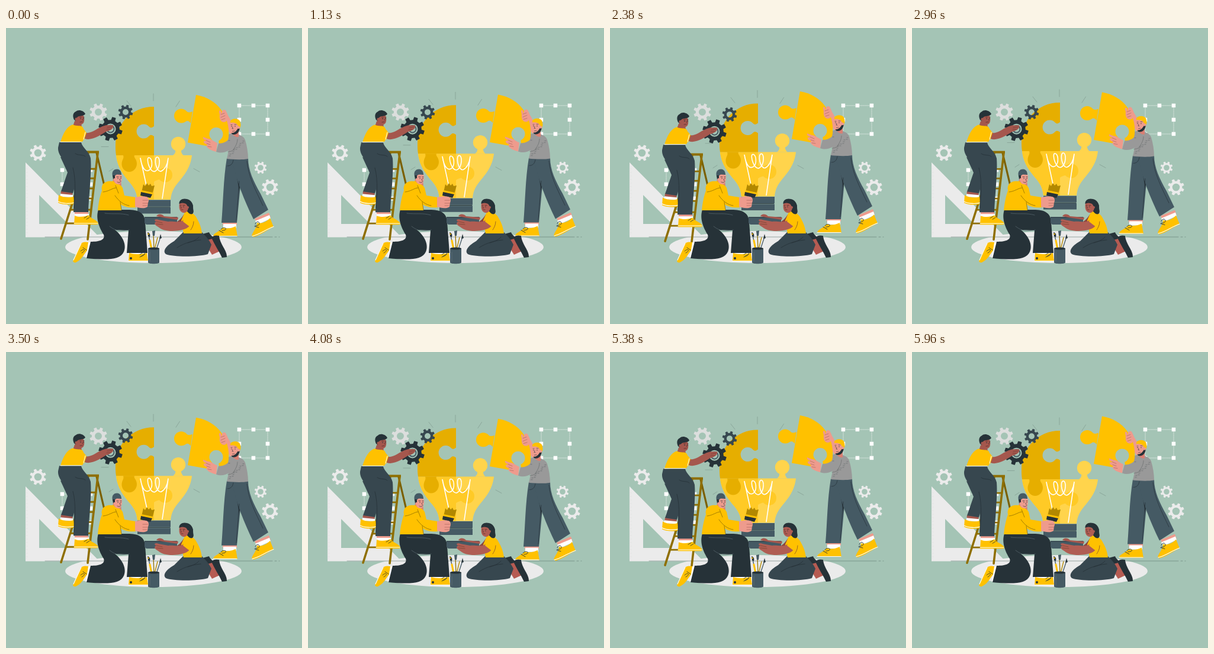
Animation of 500x500 px, one loop 6 s. Source, as an HTML page with a canvas:

```html
<!DOCTYPE html>
<html lang="en">
<head>
<meta charset="utf-8">
<title>Building an idea</title>
<style>
html, body { margin: 0; width: 100%; height: 100%; overflow: hidden; background: #a4c4b5; }
canvas { display: block; width: 500px; height: 500px; }
</style>
</head>
<body>
<canvas id="stage"></canvas>
<script>
const LOOP = 6000;
const BG = '#a4c4b5', YEL = '#ffc100', DARK = '#263238', NAVY = '#37474f', SLATE = '#455a64';
const PALE = '#ebebeb', BROWN = '#a5574d', PINK = '#ee9b8d', GOLD = '#e6ae00', WOOD = '#8f6f00';
const GLASS = '#ffd44c', AMBER = '#ffca26';
const canvas = document.getElementById('stage');
const dpr = Math.max(1, window.devicePixelRatio || 1);
canvas.width = canvas.height = 500 * dpr;
const c = canvas.getContext('2d');
const cache = {};

const path = d => cache[d] || (cache[d] = new Path2D(d));
function fill(d, color) {
  c.fillStyle = color;
  c.fill(path(d));
}
function line(d, color, width = 1) {
  c.strokeStyle = color;
  c.lineWidth = width;
  c.lineCap = c.lineJoin = 'round';
  c.stroke(path(d));
}
function oval(x, y, rx, ry, color) {
  c.fillStyle = color;
  c.beginPath();
  c.ellipse(x, y, rx, ry, 0, 0, 7);
  c.fill();
}
const dot = (x, y, r, color) => oval(x, y, r, r, color);
function shifted(dy, draw) {
  c.save();
  c.translate(0, dy);
  draw();
  c.restore();
}

// Back and forth between 0 and 1, linear in both directions
function tri(t, period) {
  const u = (t % period) / period;
  return u < .5 ? 2 * u : 2 - 2 * u;
}
function track(t, keys) {
  for (let i = 1; i < keys.length; i++) {
    const [a, x] = keys[i - 1], [b, y] = keys[i];
    if (t <= b) return x + (y - x) * (t - a) / (b - a);
  }
  return keys[keys.length - 1][1];
}
const SWAY = [[0, 0], [550, -.8], [1120, 0], [1400, 3.8], [1950, 4.6], [2500, 4], [2700, 1.5], [3000, 0]];

function gear(x, y, r, hole, color, turn = .39) {
  const n = 8, step = Math.PI * 2 / n;
  c.fillStyle = color;
  c.beginPath();
  for (let i = 0; i < n; i++) {
    for (const [f, k] of [[-.3, .75], [-.2, 1], [.2, 1], [.3, .75]]) {
      const a = turn + (i + f) * step;
      c.lineTo(x + Math.cos(a) * r * k, y + Math.sin(a) * r * k);
    }
  }
  c.closePath();
  c.moveTo(x + hole, y);
  c.arc(x, y, hole, 0, 7);
  c.fill('evenodd');
}

function selection(x, y, s) {
  c.strokeStyle = 'rgba(240,244,242,.75)';
  c.lineWidth = .8;
  c.setLineDash([2, 1]);
  c.strokeRect(x, y, s, s);
  c.setLineDash([]);
  c.fillStyle = '#fff';
  for (let i = 0; i < 3; i++) {
    for (let j = 0; j < 3; j++) {
      if (i !== 1 || j !== 1) c.fillRect(x + i * s / 2 - 3.3, y + j * s / 2 - 3.3, 6.5, 6.5);
    }
  }
}

function backdrop() {
  c.fillStyle = BG;
  c.fillRect(0, 0, 500, 500);
  c.fillStyle = PALE;
  c.fill(path('M33 227L158 353.5H33ZM56 282V331H105Z'), 'evenodd');
  for (let y = 235; y < 352; y += 3) line(`M33 ${y}H${y % 2 ? 34.5 : 36}`, '#d8dfdb', .7);
  oval(249, 370, 149, 27, PALE);
  line('M66 353H450M454 353H457M461 353H462', '#60766f', .6);
  selection(394, 131, 48);
  selection(95, 240, 48);
  gear(156, 142, 15, 6, '#dcdedd');
  gear(54, 211, 14, 6.3, PALE);
  gear(430, 236, 10.5, 4.8, PALE);
  gear(446, 269, 14, 6.3, PALE);
}

function rays() {
  line('M249 111V123M204 123L211 132M293.500 123L287 133M161 200.500H173M174 242L181 237.500M317 237.500L327 243', '#859f93', .8);
}

function bulb() {
  fill('M186 215H314C312 236 300 250 290 262C281 273 279 281 278 290H222C221 281 219 273 210 262C200 250 188 236 186 215Z', GLASS);
  fill('M250 215H186C188 236 200 250 210 262C219 273 221 281 222 290H250Z', AMBER);
  fill('M250 133C214 132.500 185 161 185 198C185 204 185 209 186 215H250V183C246 180 244 180 241.500 182.500A12 12 0 1 1 241.500 166.500C244 169 246 169 250 166Z', GOLD);
  fill('M198 215H217C215 219 221 221 221 229C221 237 215 243 208 243C201 243 195.500 237 195.500 230C195.500 222 200 221 198 215Z', GOLD);
  dot(291, 196, 12.2, GLASS);
  fill('M286 205H296C295 210 298 214 300 215H282C285 213 287 210 286 205Z', GLASS);
  fill('M249.500 237C254 240 257 241 259 240C266 233 281 236 281 248C281 261 266 264 259 256C257 256 254 257 249.500 260Z', AMBER);
  line('M238 270L227 220C230 238 236 244 242 240C249 235 247 218 241 219C236 220 243 246 252 242C261 237 261 217 255 218C249 220 254 244 262 242C270 238 273 228 274 220L264 288', '#fff', 1.6);
  fill('M222 290.500H278V301.500H222Z', SLATE);
  fill('M222 303H278V313.500H222Z', SLATE);
  line('M223 302.200H277', DARK, 1);
}

function ladder() {
  line('M153 211L166 266L180 330', '#7b6000', 3.2);
  line('M139 211L93 356', WOOD, 3.6);
  for (const y of [238, 254, 271, 288, 307, 330]) {
    const k = (y - 211) / 145;
    line(`M${139 - 46 * k} ${y}H${155 - 17 * k}`, WOOD, 2.8);
  }
  line('M155 211L138 357', WOOD, 3.6);
  fill('M132 207.500H157V211.500H132Z', WOOD);
}

function climber() {
  ladder();
  gear(202, 142, 12.5, 5, NAVY, .3);
  gear(176.500, 170.500, 20.5, 9, DARK, .3);
  c.strokeStyle = SLATE;
  c.lineWidth = 2;
  c.beginPath();
  c.arc(176.5, 170.5, 6, 0, 7);
  c.stroke();
  // far leg
  fill('M93 275L113 277L112 284L92 283Z', BROWN);
  fill('M92 280L113 282V286L92 285Z', '#fff');
  fill('M89 282C95 286 106 287 114 285L116 297C108 299 95 299 88 295Z', YEL);
  line('M88 293C96 297 108 297 116 295', '#fff', 1.2);
  fill('M92 218L130 220L113 279L93 276L104 244Z', NAVY);
  // near leg
  fill('M116 308H139V315H116Z', PINK);
  fill('M116 314H140V320H116Z', '#fff');
  fill('M116 317C123 320 134 319 139 316C143 322 154 324 156 330C156 333 150 332 144 332H115Z', YEL);
  line('M115 330H155', '#fff', 1);
  line('M132 321L137 318M136 323L141 320', DARK, .8);
  fill('M90 193H127C129 203 140 207 143 220C145 245 140 282 139 311H114C115 290 116 262 111 243C105 228 87 218 88 202Z', NAVY);
  line('M117 212C122 216 130 213 134 217M113 236C119 259 116 284 115 304', DARK, .8);
  // torso
  fill('M116 157L127 158L128 169L112 169Z', BROWN);
  fill('M113 163C119 167 127 163 130 168L135 181L129 192L92 193C96 178 103 166 113 163Z', YEL);
  line('M92 192.500H127', '#fff', 1);
  fill('M125 172C131 179 140 178 148 174C158 168 164 165 170 164L181 164C183 169 177 173 169 175C161 180 151 187 139 188C130 188 124 180 125 172Z', BROWN);
  fill('M120 169C127 167 132 170 136 177L132 189C122 187 116 178 120 169Z', YEL);
  line('M131 188L134 176', '#fff', 1);
  line('M171 168L179 167M170 171L177 171', '#713b36', .7);
  // head
  fill('M117 147C122 143 131 145 132 151C133 158 131 163 126 163C119 164 115 158 117 147Z', BROWN);
  fill('M115 155C112 149 113 143 118 141C122 137 131 139 134 145C131 150 124 147 120 151L118 157Z', DARK);
  dot(119, 154, 2.5, BROWN);
  dot(126, 153, .8, DARK);
  dot(131, 153, .8, DARK);
  line('M124.500 150.500H127.500M130 150.500H132M125 159L129 158.500M129 154L130 156', '#4d2926', .7);
}

function piece() {
  fill('M321 113C357 119 379 149 376 184L372 205L307 193.500Z', YEL);
  dot(296, 148.5, 12, YEL);
  fill('M303 140C307 143 311 143 315 141L312 161C309 156 305 156 302 159Z', YEL);
  dot(355, 179.5, 11.5, BG);
  fill('M349 186L359 188L361 205L344 202Z', BG);
}

function helper() {
  // raised arm, behind the piece
  fill('M362 154L374 146L387 168L380 180Z', PINK);
  fill('M372 181L384 177L388 190L374 196Z', '#999');
  piece();
  // shoes
  fill('M366 327H390V333H366Z', PINK);
  fill('M367 331H389V338H367Z', '#fff');
  fill('M366 337C373 340 382 338 388 335L391 352H350C350 346 361 344 366 337Z', YEL);
  line('M350 351.500H390', '#fff', 1.1);
  line('M363 340C370 333 377 342 365 342M360 342L367 346', DARK, .9);
  fill('M420 322L444 312L447 320L424 329Z', PINK);
  fill('M421 326L445 316L447 322L425 332Z', '#fff');
  fill('M424 329C432 332 442 326 446 321L452 336C441 341 430 350 418 353L415 351C417 343 424 338 424 329Z', YEL);
  line('M416 351.500C428 349 439 340 452 335.500', '#fff', 1.1);
  line('M421 331C425 321 435 334 421 334M420 335L427 337', DARK, .9);
  // trousers
  fill('M373 220H397L398 245L390 329H364C367 294 367 256 373 220Z', SLATE);
  fill('M382 222L390 252L394 276L396 262Z', DARK);
  fill('M381 220H409C409 240 418 259 430 280L443 307L418 323C402 290 389 258 381 220Z', SLATE);
  line('M384 223C383 231 378 233 374 233M394 259L389 325M407 225C409 250 421 273 434 300', DARK, .7);
  // lower arm and sweater
  fill('M361 146C359 140 360 138 363 140L364 146C364 140 367 136 371 139L374 145C376 153 373 160 367 159C362 158 360 153 361 146Z', PINK);
  line('M363 146L369 144M363 151L370 148M364 155L370 153', '#ac675f', .7);
  fill('M384 178C391 179 401 181 404 189C407 199 409 211 409 221C398 223 384 222 373 221L376 207C370 210 363 212 355 209L359 195C369 195 376 191 384 178Z', '#999');
  for (let i = 0; i < 13; i++) {
    oval(377 + (i * 17) % 28, 190 + (i * 11) % 29, 1.8, .8, '#7e8182');
  }
  line('M387 203C383 208 379 209 375 209M391 188C391 194 388 200 384 205', '#6e7171', .8);
  fill('M357 194C351 192 347 187 341 187L333 184C332 187 335 189 339 190L334 191C333 194 337 196 340 197L338 199C341 205 348 207 355 209Z', PINK);
  line('M338 190L345 193M339 195L345 197M341 200L347 201', '#ac675f', .7);
  // head
  fill('M383 171L393 170V184C389 185 385 183 383 179Z', '#d97f73');
  fill('M379 160C384 154 394 157 395 164C396 172 392 179 386 179C379 179 378 171 379 160Z', PINK);
  fill('M381 177C386 178 391 173 393 166L395 167C395 174 391 180 385 180C382 180 381 179 381 177Z', DARK);
  fill('M379 157C382 152 392 152 395 157C397 162 397 166 395 169L391 164C390 161 385 159 379 160Z', YEL);
  dot(393, 168, 2.3, PINK);
  dot(381, 166, .7, DARK);
  dot(387, 166, .7, DARK);
  line('M380 163.500H382M386 163H389M383 167L382 170L384 170M382.500 174.500L386 174', DARK, .6);
}

function kneeler() {
  // shoes
  fill('M126 365C130 360 136 362 140 362L138 375C133 379 129 391 118 396C114 397 112 394 114 391Z', YEL);
  line('M114 392L127 364', '#fff', 1.1);
  line('M126 377C132 371 136 376 128 380M130 371L136 375', DARK, .8);
  fill('M139 362L145 362L140 389L135 388Z', '#fff');
  fill('M207 376H238V383H207Z', '#fff');
  fill('M208 380C216 383 231 382 238 380L240 394H207Z', YEL);
  line('M207 393.500H240', '#fff', 1);
  dot(211, 389, 2, DARK);
  line('M226 383C235 374 239 383 228 386M226 387L234 382', DARK, .8);
  // legs
  fill('M156 307H205C224 307 234 312 235 327L239 380L204 380L207 342L184 341C198 352 204 367 199 378C193 392 171 392 136 389L143 361C158 361 168 358 165 349C158 338 151 322 156 307Z', DARK);
  line('M167 313C182 315 194 312 207 316M175 335C188 345 196 343 208 341', '#596970', .7);
  // brush
  fill('M232 264L235 267L238 262L241 266L244 263L246 267L251 266L247 281L229 277Z', '#b28800');
  fill('M229 274L248 278L247 282L228 278Z', YEL);
  fill('M228 277L247 281L244 287L227 283Z', DARK);
  fill('M232 284L239 286L237 292L230 291Z', SLATE);
  // torso and arm
  fill('M181 256L194 257L195 268L178 268Z', '#d97f73');
  fill('M181 258C186 265 193 262 197 270L200 283L219 286V303C209 304 199 302 194 298L195 308H155C157 288 162 272 166 266Z', YEL);
  fill('M163 265C168 258 177 258 182 260C186 266 179 270 171 276C164 279 159 274 163 265Z', YEL);
  line('M164 277C174 276 180 270 186 270M184 283C190 292 199 299 208 300M193 294L195 307M185 266L190 279', '#8f6f00', .8);
  fill('M218 286C224 285 230 283 237 285C241 286 242 291 240 295L239 302C234 306 224 304 218 302Z', PINK);
  line('M231 291H240M231 296H240M231 300H238', '#a7635b', .7);
  // head
  fill('M182 247H195C197 253 196 262 191 264C184 265 181 259 182 247Z', PINK);
  fill('M180 250C178 243 182 238 188 238.500C193 239 195 243 195 248C191 248 186 246 184 250L182 254Z', SLATE);
  fill('M180 249L184 249V258L181 256Z', DARK);
  dot(183.5, 256, 2.3, PINK);
  dot(189, 254, .7, DARK);
  dot(194, 254, .7, DARK);
  line('M187 251.500H190M193 251.500H195M188 260C190 262 193 261 194 259M192 255L193 258', DARK, .7);
}

function woman() {
  fill('M234 319H289V332H237L234 329Z', SLATE);
  line('M235 320H289', NAVY, 1.4);
  // feet
  fill('M332 348L343 345C345 351 354 356 362 361L355 367C346 364 338 357 332 348Z', DARK);
  fill('M334 360L348 356L361 377L348 383Z', '#b65b52');
  fill('M347 354C350 350 356 350 360 351C361 365 374 376 373 387L365 388C360 377 352 366 347 354Z', DARK);
  // legs
  fill('M299 345H331C339 353 344 359 347 366L341 382C323 387 283 387 270 382C263 376 273 366 284 360Z', NAVY);
  line('M289 371C303 362 318 359 329 358M326 353C322 358 314 361 307 363', DARK, .8);
  // near hand, torso and arm
  fill('M289 327C298 322 300 312 307 309L315 320L300 335Z', '#8b453e');
  fill('M302 311C309 308 318 313 322 321C328 331 330 339 331 347H300L296 325Z', YEL);
  fill('M254 318C256 314 262 313 267 318L291 320L290 324L264 320Z', BROWN);
  fill('M303 321C296 331 286 326 274 327L258 324C251 321 249 326 254 327C249 329 251 333 257 336C263 341 271 343 281 343C300 342 311 339 314 326Z', '#b05d53');
  fill('M303 311C310 309 317 317 317 326L312 337L299 327Z', YEL);
  line('M317 327C317 333 314 338 312 341M254 327L264 329M254 331L265 332', '#75432d', .7);
  // head
  fill('M296 293C304 286 315 292 316 301C315 306 319 310 315 314C311 316 306 311 304 306Z', DARK);
  fill('M293 296C298 291 308 294 308 302C308 309 304 313 299 312C292 310 292 302 293 296Z', '#b05d53');
  fill('M292.500 297C292 290 299 287 306 289C314 291 317 299 316 307L308 311C309 306 307 300 304 297C300 295 296 295 292.500 297Z', DARK);
  dot(307, 303, 2, '#b05d53');
  dot(295, 302, .7, DARK);
  dot(300, 302, .7, DARK);
  line('M294 299.500H296M299 299.500H302M296 307H299M296.500 303L295.500 305', '#482722', .7);
}

function pot() {
  line('M241 350L246 374', SLATE, 1.3);
  line('M249 347L250 374', WOOD, 1.3);
  line('M261 353L254 374', SLATE, 1.3);
  line('M256 354L251 374', '#b28800', 1.3);
  line('M243 359L246 374', YEL, 3);
  fill('M239 345C243 346 244 349 243 353L240 352Z', DARK);
  fill('M247 343L252 342L251 351H248Z', SLATE);
  fill('M261 348L263 355L259 356Z', DARK);
  dot(240.500, 348, 1.2, YEL);
  fill('M240 372H259V396C259 399 240 399 240 396Z', SLATE);
  oval(249.5, 372.500, 9.5, 2, DARK);
  line('M243 378V394', '#5c707a', .9);
}

function draw(t) {
  c.setTransform(dpr, 0, 0, dpr, 0, 0);
  backdrop();
  shifted(-7 * tri(t, LOOP), () => { rays(); bulb(); });
  shifted(track(t % 3000, SWAY), climber);
  shifted(t < 1000 ? 0 : -6.5 * tri(t - 1000, 3000), helper);
  kneeler();
  woman();
  pot();
}

const start = performance.now();
function tick() {
  draw((performance.now() - start) % LOOP);
  requestAnimationFrame(tick);
}
tick();
</script>
</body>
</html>
```
